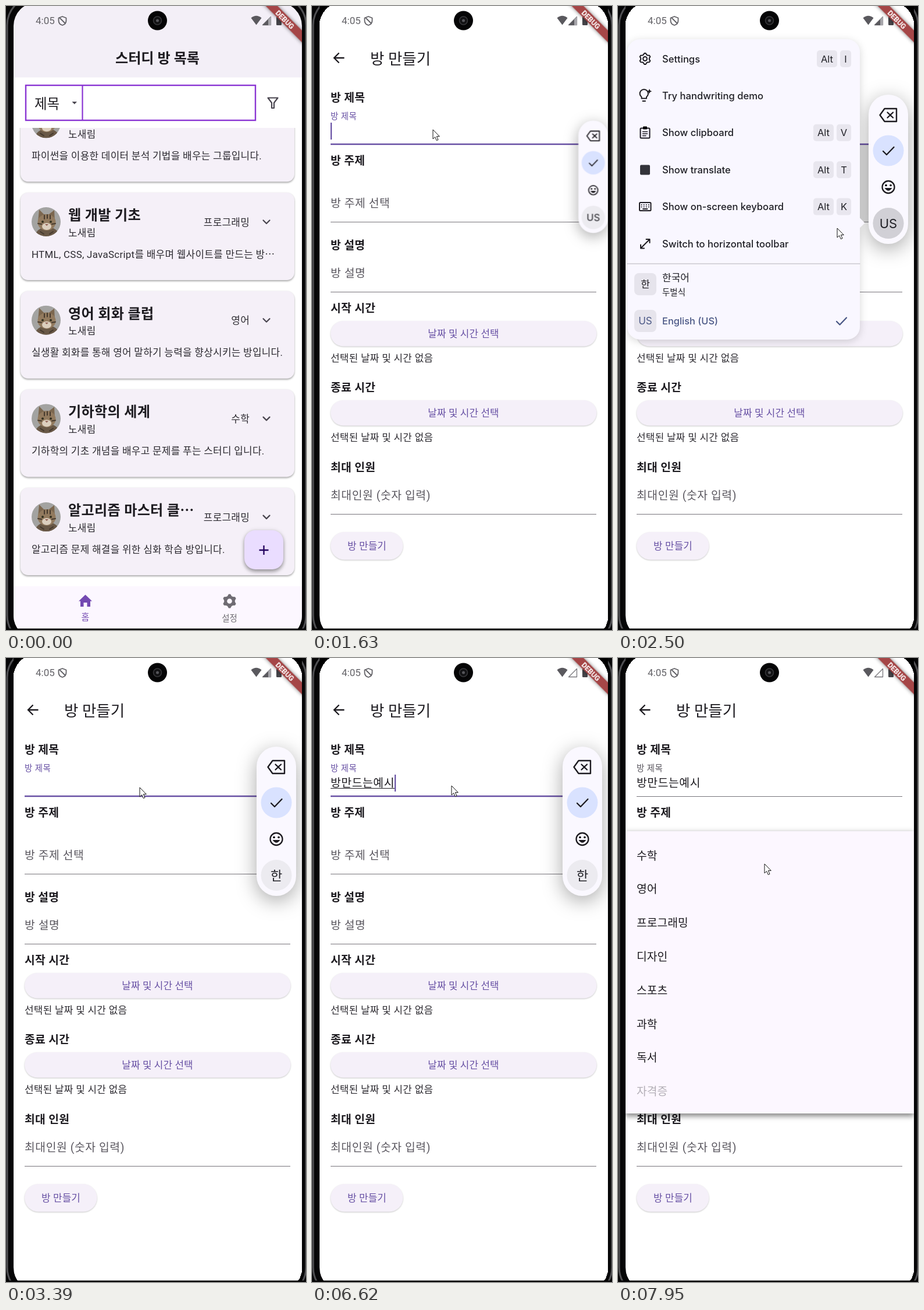
An HTML page for the animation above (8000 ms loop, 516 by 1070 pixels).

```html
<!DOCTYPE html>
<html lang="ko">
<head>
<meta charset="utf-8">
<title>스터디 방 만들기</title>
<style>
html, body { margin: 0; width: 100%; height: 100%; overflow: hidden; background: #0a0a0b; }
svg { display: block; width: 516px; height: 1070px; }
text { font-family: Roboto, "Noto Sans CJK KR", "Noto Sans CJK JP", sans-serif; fill: #1d1b20; white-space: pre; }
.b { font-weight: 700; }
.m { font-weight: 500; }
.mid { text-anchor: middle; }
.end { text-anchor: end; }
.body { letter-spacing: .3px; fill: #2c2a30; }
.head { font-weight: 700; letter-spacing: .3px; }
.input { letter-spacing: .6px; }
.hint { letter-spacing: .6px; fill: #59565e; }
.action { font-weight: 500; letter-spacing: .1px; fill: #6750a4; }
.ime { font-family: Inter, "Noto Sans CJK KR", "Noto Sans CJK JP", sans-serif; fill: #1f1f25; }
.row { font-weight: 450; }
.line { fill: none; stroke-linecap: round; stroke-linejoin: round; }
.butt { stroke-linecap: butt; }
.card { filter: drop-shadow(0 2.5px 1.5px rgba(0,0,0,.3)) drop-shadow(0 0 1px rgba(0,0,0,.08)); }
.pill { fill: #f5f0f9; filter: drop-shadow(0 1.5px 1px rgba(0,0,0,.22)); }
.fab { fill: #eaddff; filter: drop-shadow(0 4px 3px rgba(0,0,0,.32)) drop-shadow(0 0 3px rgba(0,0,0,.14)); }
.bar { fill: #faf8ff; filter: drop-shadow(0 8px 17px rgba(0,0,0,.34)); }
.sheet { fill: #f9f7ff; filter: drop-shadow(0 3px 7px rgba(0,0,0,.16)); }
.panel { fill: #fcf7ff; filter: drop-shadow(0 5px 4px rgba(0,0,0,.38)) drop-shadow(0 0 4px rgba(0,0,0,.16)); }
.ribbon { filter: drop-shadow(0 0 3px rgba(0,0,0,.5)); }
</style>
</head>
<body>
<svg id="stage" viewBox="0 0 516 1070"></svg>
<script>
const LOOP = 8000;
const INK = '#1d1b20', PURPLE = '#6750a4', GRAY = '#59565e';
const STEP = 18.36; // advance of one typed syllable

// ---------- drawing helpers ----------
const text = (x, cy, size, s, cls = '', more = '') =>
  `<text x="${x}" y="${cy + size * .37}" font-size="${size}" class="${cls}" ${more}>${s}</text>`;
const rect = (x, y, w, h, r, more = '') =>
  `<rect x="${x}" y="${y}" width="${w}" height="${h}" rx="${r}" ${more}/>`;
const circle = (x, y, r, more = '') => `<circle cx="${x}" cy="${y}" r="${r}" ${more}/>`;
const line = (d, color, w = 2, more = '', cls = '') =>
  `<path class="line ${cls}" d="${d}" stroke="${color}" stroke-width="${w}" ${more}/>`;
const shape = (d, fill, more = '') => `<path d="${d}" fill="${fill}" ${more}/>`;
const group = (id, body, more = '') => `<g id="${id}" ${more}>${body}</g>`;
const hole = (x, y, r) => `M${x - r} ${y}a${r} ${r} 0 1 0 ${2 * r} 0a${r} ${r} 0 1 0 ${-2 * r} 0Z`;

function gear(x, y, r, fill, more = '') {
  const pts = [];
  for (let k = 0; k < 24; k++) {
    const a = (k - .5) * Math.PI / 12, q = k % 4 < 2 ? r : r * .78;
    pts.push((x + q * Math.sin(a)).toFixed(1) + ' ' + (y - q * Math.cos(a)).toFixed(1));
  }
  return shape(`M${pts.join('L')}Z${hole(x, y, r * .36)}`, fill, `fill-rule="evenodd" ${more}`);
}

// ---------- list page ----------
const avatar = y => `<g transform="translate(69 ${y})" clip-path="url(#round)">
  ${circle(0, 0, 25.5, 'fill="#a3a3a1"')}
  <ellipse cx="2" cy="25" rx="21" ry="16" fill="#695846"/>
  ${shape('M-14 0L-12 -21L-4 -13H5L14 -20L15 0Z', '#7c674f')}
  <ellipse cx="1" cy="1" rx="15.5" ry="14" fill="#927a5e"/>
  ${line('M-3 -11V-5M2 -12V-6M7 -11V-5M-14 3L-8 4M16 3L10 4M-10 17L-4 21M12 17L6 21', '#463a2e', 2)}
  <ellipse cx="1" cy="8" rx="8" ry="6" fill="#dccfbe"/>
  ${circle(-6, 0, 2, 'fill="#33301f"')}${circle(8, 0, 2, 'fill="#33301f"')}
  ${shape('M-2 4H4L1 7Z', '#8f5f52')}</g>`;

const card = (y, title, topic, about) =>
  rect(25, y, 471, 150, 13, 'fill="#f5f0f8" class="card"') + avatar(y + 50) +
  text(107, y + 38, 24.1, title, 'head') + text(107, y + 68.5, 16.9, '노새림', 'body') +
  text(419, y + 50.5, 16.9, topic, 'body end') +
  line(`M442.5 ${y + 47.5}l5.5 5.5l5.5 -5.5`, '#49454f', 2.2) +
  text(44, y + 105.5, 16.9, about, 'body');

const cards = [
  ['', '', '파이썬을 이용한 데이터 분석 기법을 배우는 그룹입니다.'],
  ['웹 개발 기초', '프로그래밍', 'HTML, CSS, JavaScript를 배우며 웹사이트를 만드는 방⋯'],
  ['영어 회화 클럽', '영어', '실생활 회화를 통해 영어 말하기 능력을 향상시키는 방입니다.'],
  ['기하학의 세계', '수학', '기하학의 기초 개념을 배우고 문제를 푸는 스터디 입니다.'],
  ['알고리즘 마스터 클⋯', '프로그래밍', '알고리즘 문제 해결을 위한 심화 학습 방입니다.'],
].map((c, i) => card(151.3 + 168.7 * i, ...c)).join('');

const list = group('list',
  rect(13, -6, 496, 1075, 0, 'fill="#fff"') +
  rect(13, -6, 496, 128.5, 0, 'fill="#f3eff7"') +
  text(260.5, 89, 24.1, '스터디 방 목록', 'b mid') +
  rect(34, 136, 395, 60, 0, 'fill="none" stroke="#8a35d3" stroke-width="2.4"') +
  line('M131.5 136V196', '#8a35d3', 2.2) +
  text(49, 167, 23.5, '제목') + shape('M113.5 164H122L117.8 168.5Z', '#49454f') +
  line('M450.5 157.5H467.5L461 166V175H457V166Z', '#49454f', 2.2) +
  `<g clip-path="url(#body)">${cards}</g>` +
  rect(410, 899, 67, 67, 19, 'class="fab"') +
  rect(410, 899, 67, 67, 19, 'id="press" fill="#21005d"') +
  line('M435.5 933H451.5M443.5 925V941', '#21005d', 2.3, '', 'butt') +
  rect(13, 995, 496, 74, 0, 'fill="#fcf7ff"') +
  shape('M136.5 1009.5L148 1020.5H145V1030H139.5V1023H133.5V1030H128V1020.5H125Z', '#7449b2') +
  text(136.5, 1047.5, 15, '홈', 'mid', 'style="fill:#7449b2"') +
  gear(384.5, 1020.5, 12, '#6f6c73') +
  text(384.5, 1049.5, 14.5, '설정', 'mid', 'style="fill:#6f6c73"'));

// ---------- form page ----------
const rule = (y, id = '') => line(`M32 ${y}H489`, '#77747b', 1.2, id && `id="${id}"`, 'butt');
const picker = (y, name) =>
  text(32, y, 19.3, name, 'head') + rect(32, y + 22, 457.5, 43.5, 21.75, 'class="pill"') +
  text(260.5, y + 44, 16.9, '날짜 및 시간 선택', 'action mid') +
  text(32, y + 86, 16.9, '선택된 날짜 및 시간 없음', 'body');

const typed = [[4280, 'ㅂ'], [4420, '바'], [4560, '방'], [4680, '방ㅁ'], [4820, '방마'], [4880, '방만'],
  [5080, '방만ㄷ'], [5150, '방만드'], [5220, '방만든'], [5360, '방만드느'], [5430, '방만드는'],
  [6160, '방만드는ㅇ'], [6350, '방만드는예'], [6490, '방만드는예ㅅ'], [6620, '방만드는예시']];
const caret = (n, id) => line(`M${33 + STEP * n} 200V229`, PURPLE, 2.2, `id="${id}"`, 'butt');
const entry = typed.map(([, s], i) =>
  group('type' + i, text(32, 213.5, 19.3, s, 'input')) +
  line(`M32 223.5H${32 + STEP * s.length}`, INK, 1.2, `id="mark${i}"`, 'butt') +
  caret(s.length, 'caret' + i)).join('');

const form = group('form',
  rect(13, -6, 496, 1075, 0, 'fill="#fff"') +
  line('M55.5 89H38M46.5 80.5L38 89L46.5 97.5', INK, 2.3, 'style="stroke-linejoin:miter"', 'butt') +
  text(100, 90, 26.5, '방 만들기') +
  text(32, 156.5, 19.3, '방 제목', 'head') +
  group('label', text(0, 0, 19.3, '방 제목', 'input', 'style="fill:inherit"')) +
  rule(237.5, 'rule') + line('M32 237H489', PURPLE, 2.4, 'id="focus"', 'butt') +
  entry + caret(0, 'caret') +
  rect(32, 238, 457, 132, 0, 'id="hover"') +
  text(32, 265, 19.3, '방 주제', 'head') +
  text(32, 337.5, 19.3, '방 주제 선택', 'hint') + rule(370.5) +
  shape('M469 344.5H481L475 350.5Z', '#5f5c64') +
  text(32, 409.5, 19.3, '방 설명', 'head') + text(32, 457.5, 19.3, '방 설명', 'hint') + rule(490.5) +
  picker(518, '시작 시간') + picker(654, '종료 시간') +
  text(32, 791, 19.3, '최대 인원', 'head') +
  text(32, 839, 19.3, '최대인원 (숫자 입력)', 'hint') + rule(871.5) +
  rect(32, 902, 124.5, 47.5, 23.75, 'class="pill"') +
  text(94.5, 926, 16.9, '방 만들기', 'action mid'),
  'style="transform-origin:261px 531px"');

// ---------- topic drop-down ----------
const topics = ['수학', '영어', '프로그래밍', '디자인', '스포츠', '과학', '독서', '자격증'];
const drop = rect(13, 297, 496, 484, 0, 'id="panel" class="panel"') +
  topics.map((s, i) => group('topic' + i, text(32, 338.5 + 57.8 * i, 19.3, s, 'm'))).join('');

// ---------- input method ----------
const tools = group('tools',
  rect(431, 152, 68, 256, 34, 'class="bar"') +
  line('M458.5 176H479V198H458.5L450.5 187ZM463.5 182.5L473 191.5M473 182.5L463.5 191.5', INK, 2.4) +
  circle(465, 248, 26.5, 'fill="#d9e2ff"') +
  line('M456 249L462 255L474.5 242', INK, 2.3) +
  circle(465, 310.5, 10.5, `fill="none" stroke="${INK}" stroke-width="2.3"`) +
  circle(461, 307.5, 1.8) + circle(469, 307.5, 1.8) + shape('M458.5 312H471.5Q465 321.5 458.5 312Z', INK) +
  circle(465, 372.5, 26.5, 'fill="#ecebf0"') + circle(465, 372.5, 26.5, 'id="held" fill="#d1d0d6"') +
  group('us', text(465, 372.5, 22, 'US', 'ime mid')) + group('han', text(465, 372.5, 22, '한', 'ime mid')),
  'style="transform-origin:541px 332px"');

const key = (x, y, w, s) => rect(x, y - 14.5, w, 29, 5, 'fill="#e8e6ee"') + text(x + w / 2, y, 16.5, s, 'ime mid');
const rows = ['Settings', 'Try handwriting demo', 'Show clipboard', 'Show translate',
  'Show on-screen keyboard', 'Switch to horizontal toolbar'];
const keys = [[0, 'I', 19], [2, 'V', 25], [3, 'T', 25], [4, 'K', 25]];
const rowY = i => 90.5 + 63.4 * i;
const square = (y, s, color) => rect(28, y - 19, 38, 38, 8, 'fill="#e6e4ec"') +
  text(47, y, 17, s, 'ime mid', `style="fill:${color}"`);

const menu = group('menu',
  rect(16, 57, 400, 515, 22, 'class="sheet"') + shape('M415.5 363L424.5 372L415.5 381Z', '#f9f7ff') +
  rows.map((s, i) => text(76, rowY(i), 16.6, s, 'ime row')).join('') +
  keys.map(([i, s, w]) => key(401 - w, rowY(i), w, s) + key(401 - w - 40, rowY(i), 35, 'Alt')).join('') +
  gear(46.5, 90.5, 9.5, 'none', `stroke="${INK}" stroke-width="2" stroke-linejoin="round"`) +
  line('M40.5 156A7.2 7.2 0 1 1 49 156V158.5H40.5ZM42.5 163H47', INK, 2) +
  shape('M54 142l1.3 3l3 1.3l-3 1.3l-1.3 3l-1.3 -3l-3 -1.3l3 -1.3Z', INK) +
  rect(38.5, 209.5, 16, 17, 1.5, `fill="none" stroke="${INK}" stroke-width="2"`) + rect(43, 206.5, 7, 5, 1) +
  line('M42.5 215.5H50.5M42.5 219H50.5M42.5 222.5H48', INK, 1.6) +
  rect(38, 272.5, 17, 17, 2, 'fill="#33333a"') +
  rect(37, 337, 19.5, 14, 1.5, `fill="none" stroke="${INK}" stroke-width="2"`) +
  line('M40.5 341H53M40.5 344.5H53', INK, 2, 'stroke-dasharray="0.1 4"') + line('M43 348H50.5', INK, 1.8) +
  line('M39 415.5L54.5 400M48.5 400H54.5V406M39 409.5V415.5H45', INK, 2) +
  line('M16 442H416', '#cbc9d0', 1.5) +
  square(477, '한', INK) + text(76, 466, 17, '한국어', 'ime row') + text(76, 490.5, 14.5, '두벌식', 'ime') +
  square(540, 'US', '#4a5785') + text(76, 540, 16.4, 'English (US)', 'ime row', 'style="fill:#4a5785"') +
  line('M376 541L381.5 546.5L393 534.5', '#4a5785', 2.3),
  'style="transform-origin:424px 372px"');

// ---------- system bar ----------
const bar = text(51, 25, 17, '4:05', '', 'style="fill:#626166"') +
  line('M97 18L103.5 20.5V25C103.5 29.5 100.5 32 97 33C93.5 32 90.5 29.5 90.5 25V20.5ZM92 20L102 30', '#626166', 1.8) +
  circle(260.5, 25, 16.5, 'fill="#050506"') +
  circle(260.5, 25, 7, 'fill="#121214" stroke="#39393c" stroke-width="1.5"') + circle(260.5, 25, 2.5, 'fill="#55555a"') +
  shape('M421.5 20.5Q430.5 13 439.5 20.5L430.5 32.5Z', '#5a595e') +
  line('M455.5 18.5V32.5H441.5Z', '#77767b', 1.3) +
  group('signal', shape('M451 23V33H441Z', '#5a595e') + shape('M451 23L456 18V33H451Z', '#a5a4a9')) +
  rect(465, 18, 9, 15, 1.5, 'fill="#454449"') + rect(467.5, 16, 4, 3, 0, 'fill="#454449"') +
  `<g transform="translate(509 -6) rotate(45)">
    ${rect(-52, 33.8, 104, 14.5, 0, 'fill="#a54647" class="ribbon"')}
    ${text(0, 41, 12.3, 'DEBUG', 'b mid', 'style="fill:#fff"')}</g>`;

const pointer = group('pointer',
  shape('M0 0V16L3.7 12.6L6.3 18.6L9 17.4L6.4 11.6H11.3Z', '#fff', 'stroke="#111" stroke-linejoin="round"'));

document.getElementById('stage').innerHTML = `<defs>
  <clipPath id="screen">${rect(13, -6, 496, 1091, 40)}</clipPath>
  <clipPath id="body">${rect(13, 209, 496, 786, 0)}</clipPath>
  <clipPath id="round">${circle(0, 0, 25)}</clipPath></defs>
  ${rect(0, 0, 516, 1070, 0, 'fill="#060607"')}
  ${rect(2, -17, 514, 1112, 50, 'fill="none" stroke="#505053" stroke-width="3"')}
  <g clip-path="url(#screen)">${list}${rect(13, -6, 496, 1075, 0, 'id="scrim"')}${form}${drop}${bar}${tools}${menu}</g>
  ${rect(0, 1067.5, 516, 3, 0, 'fill="#060607"')}${pointer}`;

// ---------- motion ----------
// rows: [ms, properties, easing towards the next row]
function play(id, rows) {
  const at = ([ms, props, easing = 'linear']) => ({ ...props, offset: ms / LOOP, easing });
  const frames = rows.map(at);
  if (rows[0][0] > 0) frames.unshift(at([0, rows[0][1]]));
  const last = rows[rows.length - 1];
  if (last[0] < LOOP) frames.push(at([LOOP, last[1]]));
  document.getElementById(id).animate(frames, { duration: LOOP, iterations: Infinity });
}
// visible only inside the given [from, to] spans
function show(id, ...spans) {
  const rows = spans[0][0] > 0 ? [[0, { opacity: 0 }, 'step-end']] : [];
  for (const [from, to] of spans) {
    rows.push([from, { opacity: 1 }, 'step-end']);
    if (to < LOOP) rows.push([to, { opacity: 0 }, 'step-end']);
  }
  play(id, rows);
}
const fade = (id, ...steps) => play(id, steps.map(([ms, opacity]) => [ms, { opacity }]));
const scale = s => ({ transform: `scale(${s})` });

const PUSH = 590, FOCUS = 1420, BLUR = 7650, OPEN = 7667;

fade('press', [400, 0], [500, .12], [620, .12], [660, 0]);
play('list', [[PUSH, scale(1), 'cubic-bezier(.05,.7,.1,1)'], [PUSH + 300, scale(1.05)]]);
fade('scrim', [652, 0], [715, .6]);
play('form', [
  [PUSH, { ...scale(.85), opacity: 0 }, 'cubic-bezier(.3,0,.8,.5)'],
  [627, { ...scale(.89), opacity: 0 }],
  [665, { ...scale(.945), opacity: 1 }, 'ease-out'],
  [760, { ...scale(.9893), opacity: 1 }, 'ease-out'],
  [PUSH + 300, { ...scale(1), opacity: 1 }],
]);

const rest = 'translate(32px,204.5px) scale(1)', raised = 'translate(32px,188.5px) scale(.75)';
play('label', [
  [FOCUS, { transform: rest, fill: GRAY }, 'cubic-bezier(.4,0,.2,1)'],
  [FOCUS + 165, { transform: raised, fill: PURPLE }],
  [BLUR, { transform: raised, fill: PURPLE }],
  [BLUR + 100, { transform: raised, fill: GRAY }],
]);
show('rule', [0, FOCUS], [BLUR, LOOP]);
show('focus', [FOCUS, BLUR]);
show('caret', [1500, 2000], [2500, 3000], [3530, 4010]);
fade('hover', [1840, 0], [1890, .1], [3240, .1], [3300, 0]);

typed.forEach(([from], i) => {
  const end = i + 1 < typed.length ? typed[i + 1][0] : LOOP;
  const off = from === 5430 ? 5900 : Math.min(end, 7160);
  show('type' + i, [from, end]);
  show('mark' + i, [from, Math.min(end, BLUR)]);
  show('caret' + i, [from, off]);
});

play('tools', [
  [1555, { ...scale(.5), opacity: 0 }, 'step-end'],
  [1560, { ...scale(.5), opacity: 1 }],
  [1700, { ...scale(1), opacity: 1 }],
  [BLUR, { ...scale(1), opacity: 1 }],
  [BLUR + 80, { ...scale(1), opacity: 0 }],
]);
show('held', [2250, 2950]);
show('us', [0, 2960]);
show('han', [2960, LOOP]);
play('menu', [
  [2290, { ...scale(.8), opacity: 0 }, 'ease-out'],
  [2430, { ...scale(1), opacity: 1 }],
  [2900, { ...scale(1), opacity: 1 }],
  [3000, { ...scale(.95), opacity: 0 }],
]);
show('signal', [0, 3500]);

const small = { y: '305px', height: '58px' }, full = { y: '297px', height: '484px' };
play('panel', [
  [OPEN, { ...small, opacity: 0 }],
  [OPEN + 75, { ...small, opacity: 1 }, 'ease-out'],
  [OPEN + 150, { ...full, opacity: 1 }],
]);
topics.forEach((_, i) => {
  const unit = 150 / (topics.length + 1.5), start = OPEN + 150 + (i + 1) * unit;
  fade('topic' + i, [start, 0], [Math.min(start + 1.5 * unit, LOOP), 1]);
});

const path = [[130, 500, 985], [400, 445, 931], [950, 445, 931], [1350, 208, 212], [1760, 208, 212],
  [2150, 462, 368], [2330, 462, 368], [2500, 377, 381], [2570, 377, 381], [2800, 96, 470], [2960, 96, 470],
  [3330, 230, 222], [3390, 230, 222], [3600, 239, 221], [3740, 239, 221], [3800, 240, 219],
  [7160, 240, 219], [7500, 252, 353]];
const hidden = { transform: 'translate(500px,985px)', opacity: 0 };
play('pointer', [[0, hidden, 'step-end'],
  ...path.map(([ms, x, y]) => [ms, { transform: `translate(${x}px,${y}px)`, opacity: 1 }, 'ease-in-out'])]);
</script>
</body>
</html>
```
